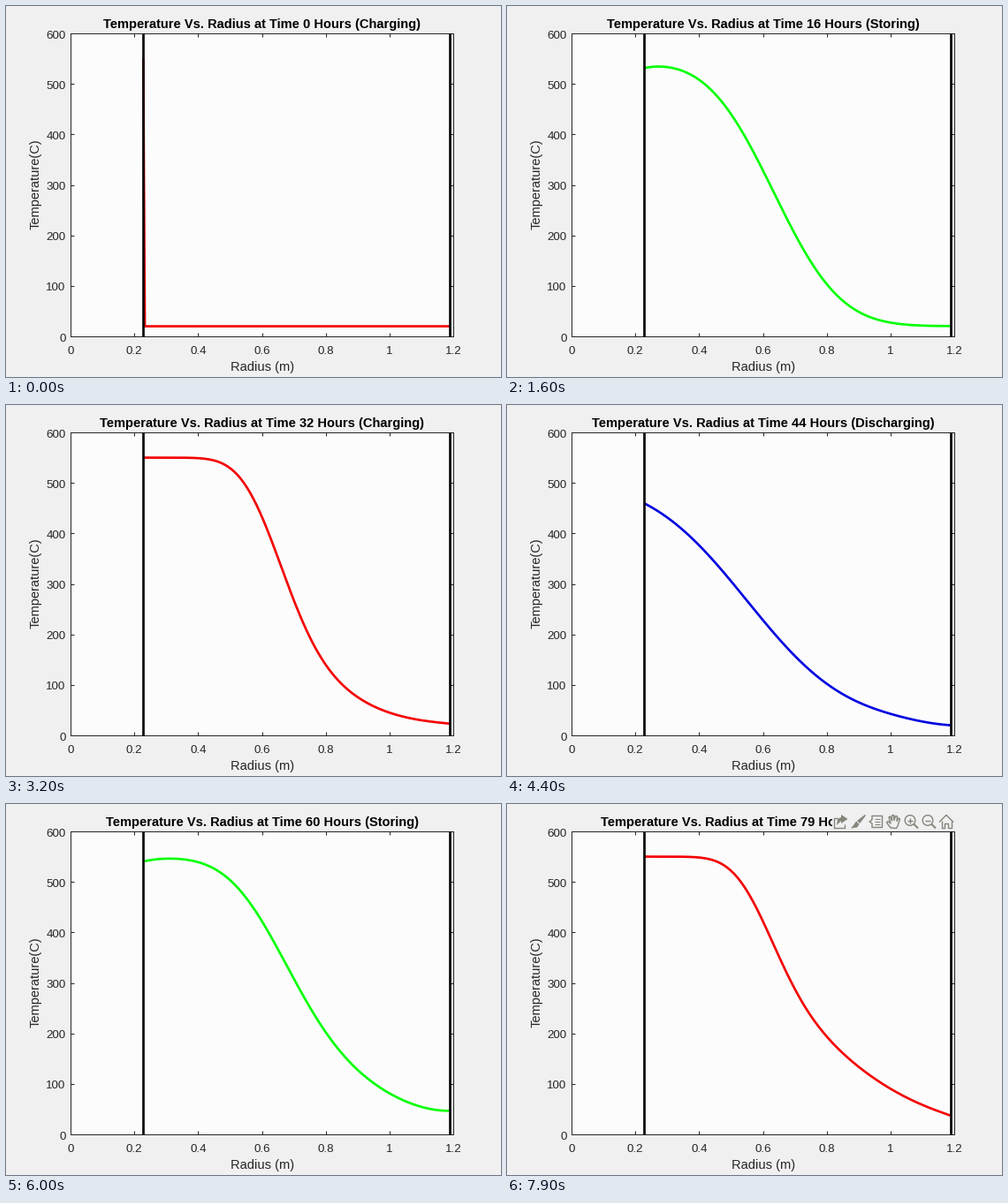
These frames come from a looping animation (560 by 420 pixels, 8 s). A matplotlib script:

```python
import numpy as np
import matplotlib.pyplot as plt
from matplotlib.animation import FuncAnimation
from matplotlib.patches import Circle, Polygon, Rectangle

W, H, DPI = 560, 420, 100
PX = 72 / DPI  # points per pixel
HOURS, INTERVAL = 80, 100

PAPER, PLOT, INK, ICON = "#f0f0f0", "#fcfcfd", "#262626", "#85857c"
COLORS = {"Charging": "#f40000", "Storing": "#00ff00", "Discharging": "#0000e0"}

# Plot area in pixels
LEFT, RIGHT, TOP, BOTTOM = 73, 506, 31, 374
TICK = 4

# Radial packed bed: metres, hours, degrees C
R_IN, R_OUT = 0.228, 1.19
T_HOT, T_COLD = 550, 20
FLOW, ALPHA, LOSS = 0.0233, 0.00106, 0.25
SUBSTEPS = 100
r = np.linspace(R_IN, R_OUT, 193)
dr = r[1] - r[0]


def mode_at(hour):
    phase = (hour - 1) % 24 if hour else 0
    return ("Charging", "Storing", "Discharging")[phase // 8]


def advance(T, mode):
    """Return the temperature profile one hour later."""
    T = T.copy()
    flow = {"Charging": FLOW, "Storing": 0, "Discharging": -FLOW}[mode]
    drift = (ALPHA - flow) / r[1:-1]
    dt = 1 / SUBSTEPS
    for _ in range(SUBSTEPS):
        slope = (T[2:] - T[:-2]) / (2 * dr)
        curvature = (T[2:] - 2 * T[1:-1] + T[:-2]) / dr**2
        T[1:-1] += dt * (ALPHA * curvature + drift * slope)
        if mode == "Charging":
            T[0], T[-1] = T_HOT, 2 * T[-2] - T[-3]
        elif mode == "Storing":
            T[0], T[-1] = T[1] - dr * LOSS * (T[1] - T_COLD), T[-2]
        else:
            T[0], T[-1] = 2 * T[1] - T[2], T_COLD
    return T


def simulate():
    T = np.full(r.size, float(T_COLD))
    T[0] = T_HOT
    profiles = [T]
    for hour in range(1, HOURS):
        profiles.append(advance(profiles[-1], mode_at(hour)))
    return profiles


def to_x(radius):
    return LEFT + (RIGHT - LEFT) * radius / 1.2


def to_y(temp):
    return BOTTOM + (TOP - BOTTOM) * temp / 600


plt.rcParams["font.family"] = "Liberation Sans"
fig = plt.figure(figsize=(W / DPI, H / DPI), dpi=DPI, facecolor=PAPER)
ax = fig.add_axes([0, 0, 1, 1])
ax.set(xlim=(0, W), ylim=(H, 0))
ax.axis("off")


def line(xs, ys, color=INK, width=1.0, **kw):
    return ax.plot(xs, ys, color=color, lw=width * PX,
                   solid_capstyle="butt", **kw)[0]


def label(x, y, text, size=14.67, color=INK, **kw):
    kw = {"ha": "center", "va": "baseline", **kw}
    return ax.text(x, y, text, fontsize=size * PX, color=color, **kw)


def draw_axes():
    ax.add_patch(Rectangle((LEFT, TOP), RIGHT - LEFT, BOTTOM - TOP,
                           fc=PLOT, ec="none", zorder=0))
    line([LEFT, RIGHT, RIGHT, LEFT, LEFT], [TOP, TOP, BOTTOM, BOTTOM, TOP],
         solid_joinstyle="miter", zorder=1)
    for i in range(7):
        x, y = to_x(0.2 * i), to_y(100 * i)
        for edge, inner in ((TOP, TOP + TICK), (BOTTOM, BOTTOM - TICK)):
            line([x, x], [edge, inner], zorder=1)
        for edge, inner in ((LEFT, LEFT + TICK), (RIGHT, RIGHT - TICK)):
            line([edge, inner], [y, y], zorder=1)
        label(x, 393.7, f"{0.2 * i:.2g}", 13.33)
        label(67.6, y + 5.6, str(100 * i), 13.33, ha="right")
    label(290, 413, "Radius (m)")
    label(40.4, 201.5, "Temperature(C)", rotation=90, ha="right", va="center")
    for radius in (R_IN, R_OUT):
        x = to_x(radius)
        line([x, x], [TOP, BOTTOM], "black", 2.67, zorder=4)


def draw_toolbar():
    """Small grey plot tools over the top right corner."""
    parts = [ax.add_patch(Rectangle((368, 9), 139, 21, fc=PAPER, ec="none"))]

    def stroke(*pts, width=1.4):
        parts.append(line(*zip(*pts), color=ICON, width=width))

    def fill(*pts):
        parts.append(ax.add_patch(Polygon(pts, fc=ICON, ec="none")))

    # Export
    stroke((374, 16), (370, 16), (370, 27), (382, 27), (382, 23))
    fill((378, 12), (385.5, 17), (378, 22), (378, 19), (373, 24), (374, 17),
         (378, 15))
    # Brush
    fill((405, 12), (406, 13), (399, 22), (396, 19))
    fill((395, 19.5), (398.5, 23), (396, 26.5), (389, 27.5), (392, 24))
    # Data tip
    stroke((413, 18), (413, 13.5), (424.5, 13.5), (424.5, 26.5), (413, 26.5),
           (413, 22), (410, 20), (413, 18))
    for y in (17, 20, 23):
        stroke((415.5, y), (422, y), width=1.1)
    # Hand
    stroke((434, 27), (429.5, 21), (431, 19.5), (434, 22), (432, 15),
           (433.5, 14), (435.5, 19), (435.5, 13), (437.5, 12.5), (438, 18.5),
           (439.5, 13.5), (441.5, 14), (441, 19.5), (443, 16), (444.5, 17),
           (442, 25), (440.5, 27.5), (434, 27))
    # Zoom in and out
    for x in (456, 476):
        parts.append(ax.add_patch(Circle((x, 18.5), 5.8, fc="none", ec=ICON,
                                         lw=1.4 * PX)))
        stroke((x + 4, 22.5), (x + 9, 27.5), width=2)
        stroke((x - 3, 18.5), (x + 3, 18.5))
    stroke((456, 15.5), (456, 21.5))
    # Home
    stroke((489, 20.5), (497, 12.5), (505, 20.5))
    stroke((491.5, 18.5), (491.5, 27), (495, 27), (495, 22), (499, 22),
           (499, 27), (502.5, 27), (502.5, 18.5))
    for part in parts:
        part.set_zorder(10)
    return parts


draw_axes()
toolbar = draw_toolbar()
title = label(290, 24.5, "", color="black", weight="bold")
curve = line([], [], width=2.67, zorder=3, snap=False)
profiles = simulate()


def update(hour):
    mode = mode_at(hour)
    title.set_text(f"Temperature Vs. Radius at Time {hour} Hours ({mode})")
    curve.set_data(to_x(r), to_y(profiles[hour]))
    curve.set_color(COLORS[mode])
    for part in toolbar:
        part.set_visible(hour == HOURS - 1)
    return [title, curve, *toolbar]


anim = FuncAnimation(fig, update, frames=HOURS, interval=INTERVAL,
                     repeat=True, repeat_delay=0)
plt.show()
```
